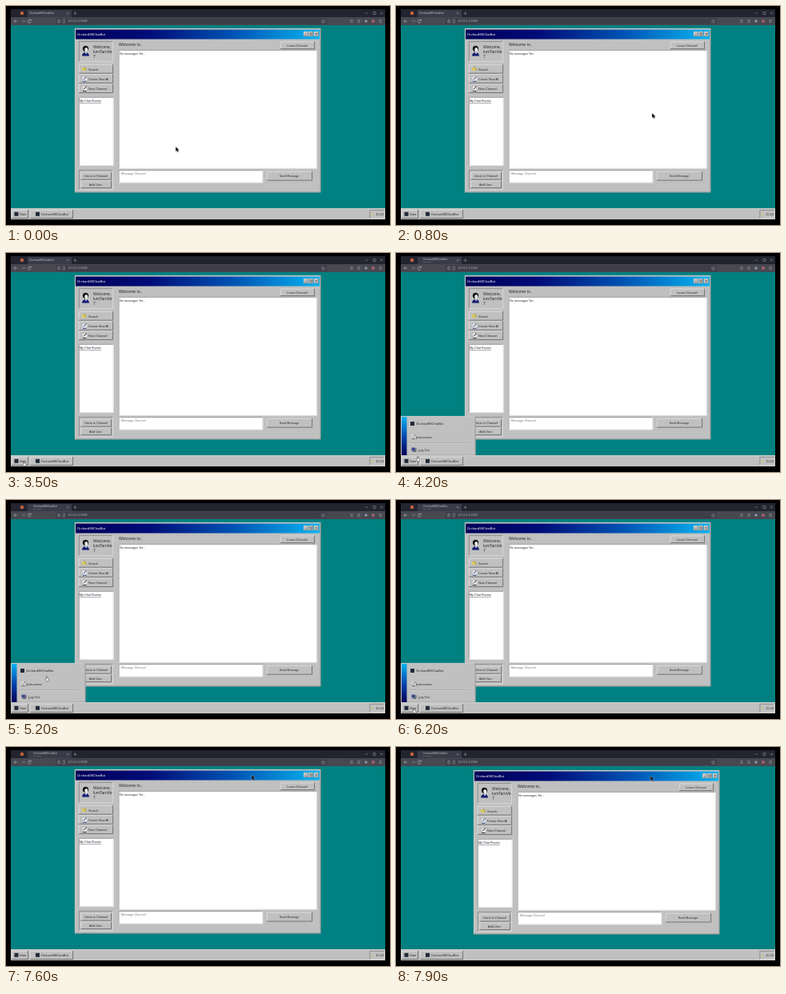
Recreate the animation shown at these times as an HTML page. Size 480 px wide and 274 px high, loop 8000 ms.

```html
<!DOCTYPE html>
<html lang="en">
<head>
<meta charset="utf-8">
<title>Desktop chat</title>
<style>
html, body { margin: 0; width: 100%; height: 100%; overflow: hidden; background: #000; }
svg { display: block; width: 100vw; height: 100vh; }
text { font-family: "Liberation Sans", Arial, sans-serif; white-space: pre; }
</style>
</head>
<body>
<svg id="stage" viewBox="0 0 480 274"></svg>
<script>
const APP = "Orchard98ChatBot";
const GRAY = "#c0c0c0", INK = "#2a2a2a";
const LOOP = 8000, STEP = 100;

const rect = (x, y, w, h, fill) =>
  `<rect x="${x}" y="${y}" width="${w}" height="${h}" fill="${fill}"/>`;
const line = (d, color, width = 0.6) =>
  `<path d="${d}" fill="none" stroke="${color}" stroke-width="${width}"/>`;
const disc = (x, y, r, fill) => `<circle cx="${x}" cy="${y}" r="${r}" fill="${fill}"/>`;
const label = (x, y, str, size = 3.9, fill = INK, attrs = "") =>
  `<text x="${x}" y="${y}" font-size="${size}" fill="${fill}" ${attrs}>${str}</text>`;
const centered = (x, y, str, size = 3.8) => label(x, y, str, size, INK, 'text-anchor="middle"');

function bevel(x, y, w, h, fill, light, dark) {
  return rect(x, y, w, h, fill) +
    line(`M${x + 0.35} ${y + h}V${y + 0.35}H${x + w}`, light, 0.7) +
    line(`M${x} ${y + h - 0.4}H${x + w - 0.4}V${y}`, dark, 0.8);
}
const raised = (x, y, w, h) => bevel(x, y, w, h, GRAY, "#e4e4e4", "#606060");
const panel = (x, y, w, h) => bevel(x, y, w, h, GRAY, "#cccccc", "#8c8c8c");
const sunken = (x, y, w, h, fill = GRAY) => bevel(x, y, w, h, fill, "#787878", "#dcdcdc");

function browser() {
  const icons = [432, 441, 450, 459, 468].map((x, i) =>
    i === 2 ? disc(x, 19, 1.8, "#8a94a4")
    : i === 3 ? rect(x - 1.8, 17.2, 3.6, 3.6, "#a0606a")
    : line(`M${x - 1.7} 17.6h3.4M${x - 1.7} 19h3.4M${x - 1.7} 20.4h3.4`, "#a4a4ac", 0.5)).join("");
  return rect(6, 4, 468, 10.5, "#232430") + rect(6, 14, 468, 10, "#474850") +
    rect(27, 5, 55, 9, "#3a3b48") +
    disc(20, 9, 2.2, "#c9643a") +
    `<g id="quietTab">${label(29, 10.2, APP, 3.7, "#c0c0c8")}</g>` +
    `<g id="soundTab">${label(34, 9, APP, 3.6, "#c0c0c8")}${label(34, 12.4, "PLAYING", 2.4, "#a0a0a8")}</g>` +
    line("M76 7.9l2.4 2.4m0-2.4l-2.4 2.4M86.5 7.2v4m-2-2h4", "#a4a4ac", 0.5) +
    line("M449 9h3M459 7.5h3v3h-3zM468 7.5l3 3m0-3l-3 3", "#a4a4ac", 0.5) +
    line("M14 19h-4m1.7-1.7L10 19l1.7 1.7", "#c0c0c8", 0.6) +
    line("M19.5 19h4m-1.7-1.7l1.7 1.7-1.7 1.7", "#85858f", 0.6) +
    line("M31 18a2 2 0 1 0 .2 1.8M31.3 16.6v1.6h-1.6", "#c0c0c8", 0.6) +
    `<rect x="62" y="15.3" width="339" height="7.6" rx="1.2" fill="#3d3e48"/>` +
    line("M65 18.8v-1.6h2v1.6m-2.3 0h2.6v2.2h-2.6zM71 17h2.5v4H71z", "#a0a0a8", 0.5) +
    label(77.5, 20.4, "127.0.0.1:5500/", 3.5, "#b6b6be") +
    line("M396.5 17l.7 1.4 1.6.2-1.2 1.1.3 1.6-1.4-.8-1.4.8.3-1.6-1.2-1.1 1.6-.2z", "#a8a8b0", 0.45) +
    icons;
}

function sidebar() {
  const avatar = disc(99.5, 53.3, 3.6, "#111") +
    `<path d="M95 62.5q.5-4.5 4.5-4.5t4.5 4.5z" fill="#101a70"/>` +
    `<ellipse cx="100.3" cy="54.6" rx="2" ry="2.7" fill="#eee"/>` +
    `<path d="M98.8 58.2h2.4l-1.2 2.4z" fill="#fff"/>`;
  const buttons = ["Search", "Create New AI", "New Channel"].map((name, i) => {
    const y = 73 + i * 12.2;
    const icon = i === 0
      ? rect(95, y + 4, 5.5, 4, "#d8c860") + line(`M98 ${y + 3}l3 5`, "#707050")
      : rect(96, y + 3.5, 4.5, 5.5, "#eee") +
        line(`M96 ${y + 9}h4.5M97 ${y + 7}l3.5-4`, i === 1 ? "#263e78" : "#222", 1);
    return raised(91, y, 43, 11.5) + icon + label(103, y + 7.5, name);
  }).join("");
  return sunken(91, 44, 43, 26) + avatar +
    label(109, 53.4, "Welcome,", 5) + label(109, 59.1, "lumTarnVe", 5) + label(109, 64.8, "7", 5) +
    buttons + sunken(91, 114, 43.5, 86, "#fff") +
    label(92, 120.2, "My Chat Rooms", 3.75, "#202030", 'text-decoration="underline"') +
    sunken(91, 205, 43, 25.5) +
    raised(93.5, 208, 38.5, 9.5) + centered(112.5, 214.2, "Users in Channel") +
    raised(93.5, 218.5, 38.5, 9.5) + centered(112, 224.5, "Add User");
}

function chatWindow() {
  const controls = [372, 378.4, 385].map(x => panel(x, 32, 5.6, 6)).join("") +
    line("M373.5 36.2h2.2M380 33.7h2.3v2.5H380zM386.8 33.9l2 2.2m0-2.2l-2 2.2", "#333", 0.5);
  return panel(86, 28, 307.4, 205.3) + rect(87, 29.5, 305, 12, "url(#titleFill)") +
    label(89, 37.2, APP, 4.2, "#fff") + controls + sidebar() +
    label(141, 50.3, "Welcome to..", 5.1) +
    raised(343, 44.5, 43, 9.5) + centered(364, 50.7, "Leave Channel") +
    sunken(140.7, 55, 248, 148.5, "#fff") + label(142, 61, "No messages Yet...", 3.75) +
    sunken(140.7, 205.3, 180.5, 16, "#fff") +
    label(144, 211.3, "Message Channel", 3.8, "#777") +
    raised(326, 207, 57, 11.5) + centered(354, 214.2, "Send Message", 3.7);
}

function taskbar() {
  return rect(6, 253, 468, 14, GRAY) + rect(6, 253.4, 468, 0.7, "#d4d4d4") +
    raised(7, 255, 21, 11) + rect(10.5, 257.8, 5, 5, "#222a38") + label(17, 262, "Start", 4) +
    raised(30, 255, 54, 11) + rect(37, 257.8, 5, 5, "#222a38") + label(43.5, 262, APP, 4.15) +
    sunken(454.5, 255, 19, 11) + rect(457, 259.3, 2, 2.6, "#d0c878") +
    label(462.5, 262.1, "15:24", 3.8);
}

function startMenu() {
  const item = (x, y, name) =>
    label(x, y, `<tspan text-decoration="underline">${name[0]}</tspan>${name.slice(1)}`);
  const divider = y => rect(16, y, 75, 0.6, "#989898") + rect(16, y + 0.6, 75, 0.6, "#dcdcdc");
  return panel(6, 204, 93.5, 49.5) + rect(7, 205, 6.5, 48, "url(#menuFill)") +
    rect(18, 211, 5, 5, "#222a38") + label(25, 215.2, APP, 4.15) + divider(221) +
    rect(20, 227.5, 3.6, 4.8, "#eee") + line("M20 232.3h3.6M21 230.7l3-3.4", "#222", 0.8) +
    item(25, 231.6, "Instructions") + divider(237.3) +
    rect(19.5, 243.5, 4.5, 4, "#3c4c90") + line("M21 248.2h4v-4", "#333", 0.8) +
    item(28, 247.7, "Log Out");
}

const gradient = (id, attrs, stops) => `<linearGradient id="${id}" ${attrs}>` +
  stops.map(([at, color]) => `<stop offset="${at}" stop-color="${color}"/>`).join("") +
  "</linearGradient>";

const stage = document.getElementById("stage");
stage.innerHTML = "<defs>" +
  gradient("titleFill", "", [[0, "#000058"], [0.3, "#000c78"], [0.65, "#0054b4"], [1, "#08b4f0"]]) +
  gradient("menuFill", 'x2="0" y2="1"', [[0, "#08b4f0"], [0.5, "#0048b0"], [1, "#000058"]]) +
  "</defs>" + rect(0, 0, 480, 274, "#000") + rect(6, 24, 468, 230, "#008080") + browser() +
  `<g id="chat">${chatWindow()}</g><g id="menu">${startMenu()}</g>` + taskbar() +
  `<g id="pointer">
    <path id="arrow" d="M0 0v6l1.5-1 1 2.1 1.3-.6-1-2 1.9-.3z" fill="#111" stroke="#ddd" stroke-width=".3"/>
    <path id="hand" d="M.4 0l.9.3v2l2 .6v2l-.5 1.3H.8L-.6 3.7l.6-.5.4.3z" fill="#fff" stroke="#333" stroke-width=".5"/>
  </g>`;

const [quietTab, soundTab, chat, menu, pointer, arrow, hand] =
  ["quietTab", "soundTab", "chat", "menu", "pointer", "arrow", "hand"].map(id => document.getElementById(id));

// Pointer tip: time, x, y
const path = [
  [0, 212, 176], [800, 320, 134], [1200, 322, 118], [1800, 326, 68], [2000, 326, 68],
  [2700, 290, 110], [3500, 21.5, 260.5], [4000, 21.5, 260.5], [4700, 46, 230],
  [5200, 50, 220.5], [5700, 45, 229], [6200, 21.5, 260.5], [6400, 21.5, 260.5],
  [7000, 366, 105], [7500, 307, 35], [7600, 307, 35], [7900, 318, 36]
];
const HAND = 1400, OPEN = 3800, CLOSE = 6400, GRAB = 7600;
const held = new Set([700, 1300, 1900, 4100, 4900, 5300, 5800, 6300, 7800]);

function pointAt(t) {
  const i = Math.max(1, path.findIndex(p => p[0] >= t));
  const [t0, x0, y0] = path[i - 1], [t1, x1, y1] = path[i];
  const u = (t - t0) / (t1 - t0), k = u * u * (3 - 2 * u);
  return [x0 + (x1 - x0) * k, y0 + (y1 - y0) * k];
}

const show = (node, on) => node.setAttribute("visibility", on ? "visible" : "hidden");
const move = (node, x, y) => node.setAttribute("transform", `translate(${x} ${y})`);

function render(time) {
  let t = Math.floor(time % LOOP / STEP) * STEP;
  if (held.has(t)) t -= STEP;
  const [x, y] = pointAt(t);
  const dragging = t >= GRAB;
  move(pointer, x, y);
  show(arrow, t < HAND || dragging);
  show(hand, t >= HAND && !dragging);
  show(menu, t >= OPEN && t < CLOSE);
  show(quietTab, t < OPEN);
  show(soundTab, t >= OPEN);
  move(chat, dragging ? x - 307 : 0, dragging ? y - 35 : 0);
}

const start = performance.now();
function tick() {
  render(performance.now() - start);
  requestAnimationFrame(tick);
}
tick();
</script>
</body>
</html>
```
